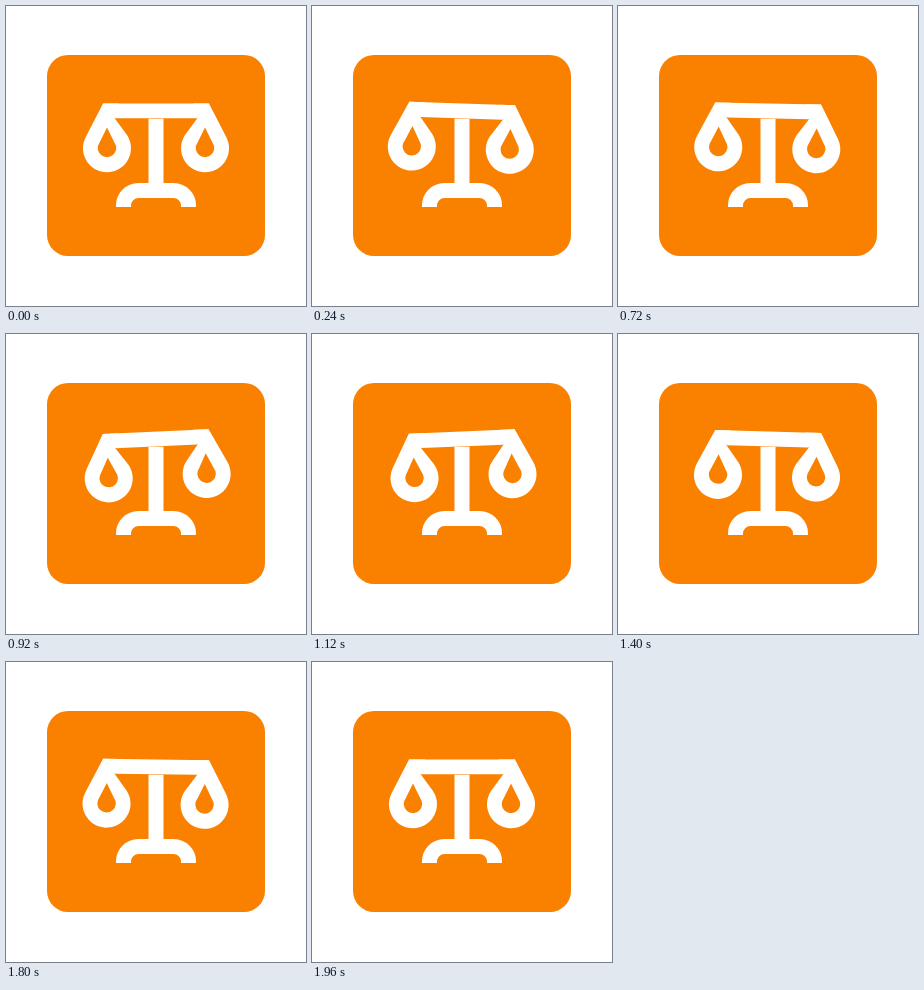
Animation of 300 by 300 pixels, one loop 2000 ms. Source, as an HTML page:

```html
<!DOCTYPE html>
<html lang="en">
<head>
<meta charset="utf-8">
<title>Balance scales</title>
<style>
html, body { margin: 0; width: 100%; height: 100%; overflow: hidden; background: #fff; }
svg { display: block; width: 100vw; height: 100vh; }
</style>
</head>
<body>
<svg viewBox="0 0 300 300">
  <defs>
    <path id="pan" fill-rule="evenodd" d="M97 97.5 L79.5 131.5 A24 24 0 1 0 121 129 L108.5 112 L113 97.5 Z
      M101 121.5 L93.6 136.5 A9.2 9.2 0 1 0 108.4 136.5 Z"/>
  </defs>
  <rect x="41" y="49" width="218" height="201" rx="21" fill="#fa8000"/>
  <g fill="#fff">
    <path d="M142.5 112.8 H157.5 V184 H142.5 Z"/>
    <path d="M117.5 201 V199.5 A15 15 0 0 1 132.5 184.5 H167.5 A15 15 0 0 1 182.5 199.5 V201" fill="none" stroke="#fff" stroke-width="15"/>
    <g id="beam">
      <path d="M97 97.5 H203 L191 112.3 H109 Z"/>
      <use href="#pan"/>
      <use href="#pan" transform="matrix(-1 0 0 1 300 0)"/>
    </g>
  </g>
</svg>
<script>
const LOOP = 2000, STEP = 40, SWING = 500;
const angles = [0, 4, -3, 2, 0];
const beam = document.getElementById('beam');
const ease = p => (1 - Math.cos(Math.PI * p)) / 2;

function tilt(t) {
  const i = Math.floor(t / SWING);
  return angles[i] + (angles[i + 1] - angles[i]) * ease(t / SWING - i);
}

const start = performance.now();
function draw() {
  const t = Math.floor((performance.now() - start) % LOOP / STEP) * STEP;
  beam.setAttribute('transform', `rotate(${tilt(t)} 150 105)`);
  requestAnimationFrame(draw);
}
draw();
</script>
</body>
</html>
```
